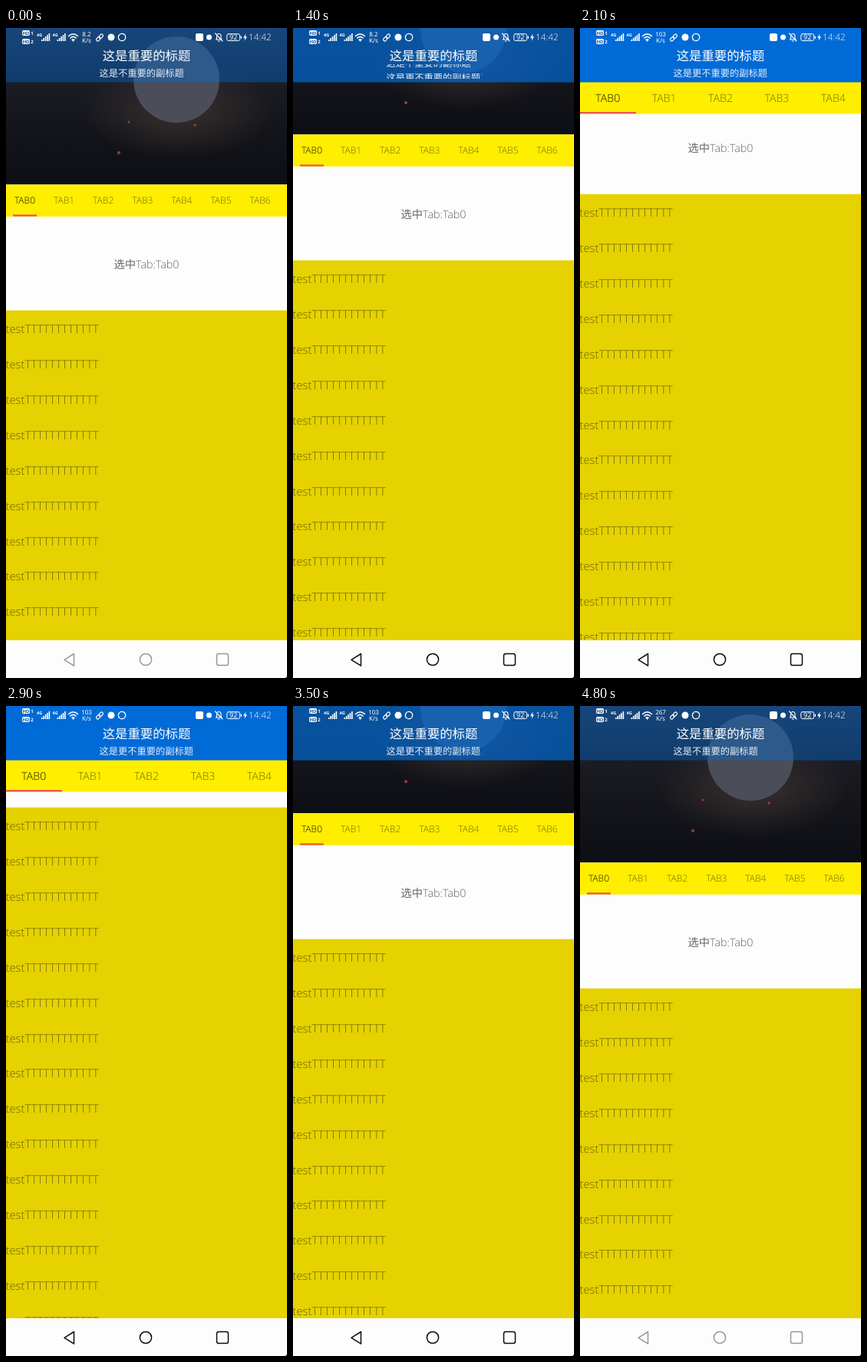
Recreate the animation shown at these times as an HTML page. Size 366 by 844 pixels, loop 4.9 s.

```html
<!DOCTYPE html>
<html lang="zh">
<head>
<meta charset="utf-8">
<style>
  html, body { margin: 0; width: 100%; height: 100%; overflow: hidden; background: #fdfdfd; }
  svg { display: block; width: 366px; height: 844px; font-family: "Noto Sans", "Noto Sans CJK SC", "Noto Sans CJK", sans-serif; text-rendering: geometricPrecision; }
  .light { font-family: "Open Sans", "Noto Sans", sans-serif; font-weight: 300; }
  .mid { text-anchor: middle; }
  .line { fill: none; stroke: #fff; stroke-linecap: round; stroke-linejoin: round; }
</style>
</head>
<body>
<svg id="stage" viewBox="0 0 366 844">
  <defs>
    <linearGradient id="night" x2="0" y2="1">
      <stop offset="0" stop-color="#252f3e"/>
      <stop offset=".4" stop-color="#191b21"/>
      <stop offset=".75" stop-color="#121318"/>
      <stop offset="1" stop-color="#0d0f16"/>
    </linearGradient>
    <radialGradient id="glow">
      <stop offset="0" stop-color="#3a302f"/>
      <stop offset="1" stop-color="#3a302f" stop-opacity="0"/>
    </radialGradient>
    <clipPath id="photoBox"><rect width="366" height="203.3"/></clipPath>
    <clipPath id="subBox"><rect x="100" y="47" width="166" height="19"/></clipPath>
    <clipPath id="screen"><rect width="366" height="795"/></clipPath>
  </defs>

  <rect width="366" height="844" fill="#fdfdfd"/>

  <g clip-path="url(#screen)">
    <g id="page">
      <rect y="203" width="366" height="164" fill="#fdfdfd"/>
      <text class="mid" x="183" y="311.5" font-size="14.3" fill="#666"><tspan>选中</tspan><tspan class="light">Tab:Tab0</tspan></text>
      <rect y="366.7" width="366" height="760" fill="#e5d200"/>
      <g id="rows" class="light" font-size="14.8" fill="#6b6200"></g>
    </g>

    <g id="photo">
      <g clip-path="url(#photoBox)">
        <rect width="366" height="204" fill="url(#night)"/>
        <ellipse cx="225" cy="105" rx="125" ry="65" fill="url(#glow)"/>
        <ellipse cx="222" cy="67" rx="56" ry="56" fill="#4b4e58"/>
        <g fill="#9a3f28">
          <circle cx="147" cy="162" r="2"/>
          <circle cx="160" cy="122" r="1.5"/>
          <circle cx="246" cy="126" r="1.8"/>
        </g>
      </g>
    </g>

    <g id="tabs">
      <rect width="366" height="41.5" fill="#ffee00"/>
      <g id="loose"></g>
      <g id="wide"></g>
    </g>

    <rect id="bar" width="366" height="70.5" fill="#006ad6"/>
    <text class="mid" x="183" y="42.3" font-size="16.4" fill="#fff">这是重要的标题</text>
    <g clip-path="url(#subBox)">
      <g id="sub" font-size="12.25" fill="#e9eff6">
        <text x="121.5" y="62.5">这是不重要的副标题</text>
        <text x="121.5" y="77.5">这是更不重要的副标题</text>
      </g>
    </g>

    <g id="status" fill="#fff">
      <g id="badges"></g>
      <g id="signals"></g>
      <g class="line" stroke-width="1.5">
        <path d="M81.5 10.5Q87.5 5 93.5 10.5M83.8 13Q87.5 9.7 91.2 13M86 15.3Q87.5 14.1 89 15.3"/>
      </g>
      <circle cx="87.5" cy="16.6" r="1.1"/>
      <text id="speed" class="mid" x="105" y="10.5" font-size="8"></text>
      <text class="mid" x="105" y="19" font-size="8">K/s</text>
      <g class="line" stroke-width="1.2" transform="translate(122 12.5) rotate(-45)">
        <rect x="-5.5" y="-1.9" width="6" height="3.8" rx="1.9"/>
        <rect x="-.5" y="-1.9" width="6" height="3.8" rx="1.9"/>
      </g>
      <circle cx="137" cy="12" r="4.5"/>
      <circle class="line" cx="151" cy="12" r="4.7" stroke-width="1.3" stroke-dasharray="8.5 1.34"/>
      <rect x="247" y="7" width="10" height="10" rx="2"/>
      <circle cx="264.5" cy="12" r="3.5"/>
      <g class="line" stroke-width="1.1">
        <path d="M273.5 15H281L280 13.5V10.5Q280 7.5 277.3 7.5Q274.6 7.5 274.6 10.5V13.5ZM276.3 17H278.3M272.5 7L282 17"/>
        <rect x="287.8" y="7.7" width="16.8" height="8.8" rx="2" stroke-width="1"/>
        <path d="M306.3 10.8V13.4" stroke-width="1.3"/>
      </g>
      <text class="mid" x="296.2" y="15.4" font-size="9">92</text>
      <path d="M312.5 7.5L309 12.8H311.2L310.6 16.8L314 11.2H311.8Z"/>
      <text class="light" x="316" y="16.3" font-size="11.8">14:42</text>
    </g>
  </g>

  <g id="nav" fill="none" stroke-width="1.5" stroke-linejoin="round">
    <path d="M76 820.3L88.5 812.5V828.2Z"/>
    <circle cx="182" cy="820" r="7.6"/>
    <rect x="274.5" y="812.5" width="15" height="15" rx="2.6"/>
  </g>
  <path d="M366 842V844H364Z" fill="#111"/>
</svg>

<script>
  const LOOP = 4900, STEP = 100;
  const TAB_TOP = 203.3, BAR = 70, PIN = 133;
  const SCROLL_START = 1000;
  // Scroll distance at each step from SCROLL_START.
  const SCROLL = [
    4, 12, 27, 45, 65, 83, 99, 113, 124, 133, 142, 151,
    166, 181, 197, 212, 226, 238, 241, 235, 181, 152, 131, 109,
    87, 64, 42, 20, 4, 0
  ];

  const $ = id => document.getElementById(id);
  const clamp = v => Math.max(0, Math.min(1, v));

  function add(parent, tag, attrs, text) {
    const el = document.createElementNS("http://www.w3.org/2000/svg", tag);
    for (const key in attrs) el.setAttribute(key, attrs[key]);
    if (text) el.textContent = text;
    parent.append(el);
    return el;
  }

  function buildTabs(group, count, first, gap, size, lineX, lineW) {
    for (let i = 0; i < count; i++) {
      add(group, "text", {
        class: "mid light", x: first + gap * i, y: 20.8 + size * 0.357,
        "font-size": size, fill: i ? "#756e06" : "#1f1d00"
      }, "TAB" + i);
    }
    add(group, "rect", { x: lineX, y: 39, width: lineW, height: 2.3, fill: "#ea584e" });
  }

  buildTabs($("loose"), 7, 24.5, 51.1, 12.1, 9, 31);
  buildTabs($("wide"), 5, 36.3, 73.4, 14.2, 0, 73);

  for (let i = 0; i < 16; i++) {
    add($("rows"), "text", { x: -0.5, y: 396 + 45.92 * i }, "test" + "T".repeat(12));
  }

  for (const [y, sim] of [[3, "1"], [14, "2"]]) {
    add($("badges"), "rect", { x: 21, y, width: 10, height: 7, rx: 1.8 });
    add($("badges"), "text", {
      class: "mid", x: 26, y: y + 5.7, "font-size": 6, "font-weight": 700, fill: "#1d4f8a"
    }, "HD");
    add($("badges"), "text", { x: 32.3, y: y + 6.2, "font-size": 6, "font-weight": 700 }, sim);
  }

  for (const x of [40, 60.5]) {
    add($("signals"), "text", { x, y: 11, "font-size": 5.5, "font-weight": 700 }, "4G");
    for (let i = 0; i < 5; i++) {
      const height = 2 + i * 2;
      add($("signals"), "rect", { x: x + 6 + i * 2.4, y: 17 - height, width: 1.6, height });
    }
  }

  const move = (id, y) => $(id).setAttribute("transform", `translate(0 ${y})`);
  const show = (id, on) => $(id).setAttribute("visibility", on ? "visible" : "hidden");

  function scrollAt(t) {
    return SCROLL[Math.floor((t - SCROLL_START) / STEP)] || 0;
  }

  function draw(t) {
    const s = scrollAt(t);
    const pinned = s >= PIN;
    move("page", -s);
    move("photo", -s);
    move("tabs", Math.max(TAB_TOP - s, BAR));
    show("loose", !pinned);
    show("wide", pinned);
    $("bar").setAttribute("fill-opacity", 0.4 + 0.6 * clamp(s / PIN));
    // The second subtitle slides in from below, then back out.
    const swap = clamp((t - 1150) / 300) - clamp((t - 3700) / 300);
    move("sub", -15 * swap - (swap === 1 ? 4 : 0));
    $("speed").textContent = t < 1600 ? "8.2" : t < 4200 ? "103" : "267";
    $("nav").setAttribute("stroke", t >= 700 && t < 4800 ? "#0c0c0c" : "#999");
  }

  // Keeps the first subtitle fully clipped once the second has settled.
  $("sub").lastElementChild.setAttribute("y", 81.5);

  const start = performance.now();
  function tick() {
    const t = (performance.now() - start) % LOOP;
    const step = Math.floor(t / STEP) * STEP;
    draw(step);
    requestAnimationFrame(tick);
  }
  tick();
</script>
</body>
</html>
```
